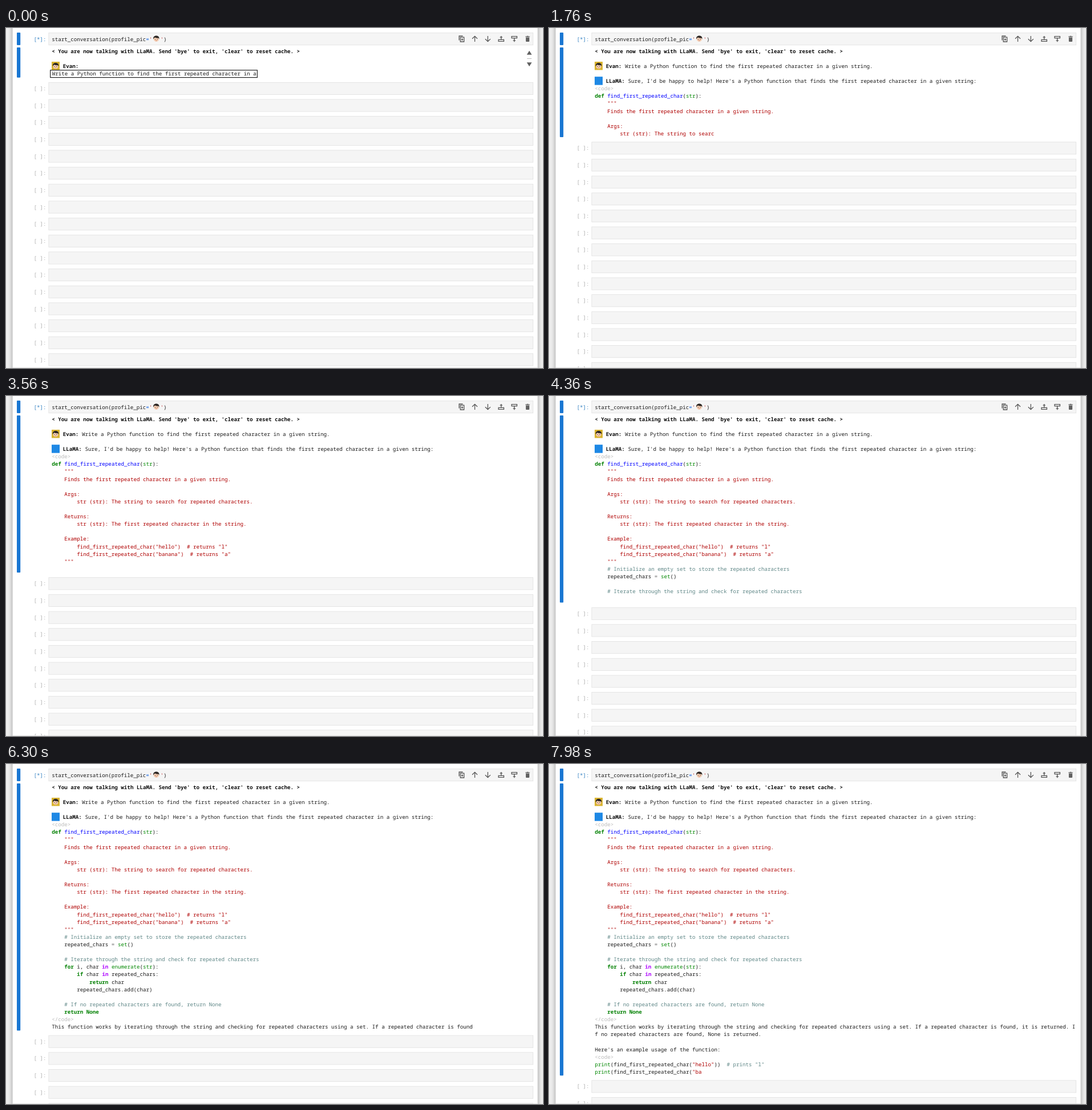
These frames come from a looping animation (941 px wide and 595 px high, 8000 ms). An HTML page:

```html
<!DOCTYPE html>
<html lang="en">
<head>
<meta charset="utf-8">
<title>Notebook chat</title>
<style>
  html, body { margin: 0; width: 100%; height: 100%; overflow: hidden; background: #eee; }
  svg { display: block; width: 941px; height: 595px; }
  text {
    font: 9.19px "Noto Sans Mono", "DejaVu Sans Mono", monospace;
    fill: #1c1c1c; white-space: pre; text-rendering: geometricPrecision;
  }
  .paper { fill: #fff; filter: drop-shadow(0 1px 4px rgba(0, 0, 0, .38)); }
  .box { fill: #f5f5f5; stroke: #e0e0e0; stroke-width: .8; }
  .bar { fill: #1976d2; }
  .icon { fill: none; stroke: #555; stroke-width: 1.3; }
  .solid { fill: #616161; }
  .bold { font-weight: 700; fill: #111; }
  .idle { fill: #adadad; }
  .busy { fill: #307fc1; }
  .tag { fill: #bcbcbc; }
  .str { fill: #af0000; }
  .com { fill: #5f8787; }
  .key { fill: #008000; font-weight: 700; }
  .word { fill: #af00ff; font-weight: 700; }
  .fn { fill: #0000ff; }
  .type { fill: #008700; }
  .op { fill: #666; }
  .assign { fill: #055be0; }
  .quote { fill: #ba2121; }
</style>
</head>
<body>
<svg viewBox="0 0 941 595">
  <defs>
    <g id="boy">
      <ellipse cx="0" cy=".6" rx="4.6" ry="4.4" fill="#f6cfb4"/>
      <path d="M-4.9 1C-6-3-3.6-5.4 0-5.4S6-3 4.9 1L4-1.2Q0-.6-2.4-2.2L-4-1Z" fill="#2b2522"/>
      <circle cx="-1.8" cy="1" r=".65" fill="#2b2522"/>
      <circle cx="1.8" cy="1" r=".65" fill="#2b2522"/>
      <path d="M-1.2 3.1Q0 3.9 1.2 3.1" fill="none" stroke="#b4604c" stroke-width=".7"/>
    </g>
  </defs>
  <rect class="paper" x="11.6" y="-30" width="920" height="660"/>

  <rect class="box" x="74.9" y="8.4" width="848.7" height="21.4"/>
  <rect class="bar" x="19" y="8" width="6.2" height="22" rx="1"/>
  <text class="busy" x="48.5" y="22.5">[*]:</text>
  <text x="80.2" y="22.5">start_conversation(profile_pic<tspan class="assign">=</tspan><tspan class="quote">'</tspan></text>
  <use href="#boy" x="263.3" y="18.8"/>
  <text x="270.6" y="22.5"><tspan class="quote">'</tspan>)</text>

  <g class="icon">
    <path d="M794 21.5V14H800.5M796.2 16.2H802.6V24H796.2ZM797.6 20.1H801.2M799.4 18.3V21.9"/>
    <path d="M821.5 24V14.4M817 18.8L821.5 14.3L826 18.8"/>
    <path d="M844.3 14V23.6M839.8 19.2L844.3 23.7L848.8 19.2"/>
    <path d="M863 20.4H872.4V23.4H863ZM867.7 20V14M865.5 16.2H869.9"/>
    <path d="M886 14.6H895.4V17.6H886ZM890.7 18V24.2M888.5 21.8H892.9"/>
  </g>
  <path class="solid" d="M910.3 14.6H912.4L913 13.8H915L915.6 14.6H917.7V15.8H910.3ZM910.9 16.5H917.1V23Q917.1 24 916.1 24H911.9Q910.9 24 910.9 23Z"/>
  <g id="out"></g>
  <rect y="594" x="12" width="919" height="1" fill="#e4e4e4"/>
</svg>

<script>
const LOOP = 8000, STEP = 20;
const X = 80.3, NAME_X = 99.8, CHAR = 5.514, TOP = 33.7, ROW = 13.115, COLS = 153;
const USER = "Evan:", BOT = "LLaMA: ";
const question = "Write a Python function to find the first repeated character in a given string.";
const answer = `Sure, I'd be happy to help! Here's a Python function that finds the first repeated character in a given string:
<code>
def find_first_repeated_char(str):
    """
    Finds the first repeated character in a given string.

    Args:
        str (str): The string to search for repeated characters.

    Returns:
        str (str): The first repeated character in the string.

    Example:
        find_first_repeated_char("hello")  # returns "l"
        find_first_repeated_char("banana")  # returns "a"
    """
    # Initialize an empty set to store the repeated characters
    repeated_chars = set()

    # Iterate through the string and check for repeated characters
    for i, char in enumerate(str):
        if char in repeated_chars:
            return char
        repeated_chars.add(char)

    # If no repeated characters are found, return None
    return None
</code>
This function works by iterating through the string and checking for repeated characters using a set. If a repeated character is found, it is returned. If no repeated characters are found, None is returned.

Here's an example usage of the function:
<code>
print(find_first_repeated_char("hello"))  # prints "l"
print(find_first_repeated_char("banana"))`;

// The stream arrives in word pieces; the newest letter is held back until the next piece.
const pieces = answer.match(/ {2,}(?= )|\n| ?(?:re(?=peated_)|pe(?=ated_)|ban(?=ana)|[A-Za-z]+|[^A-Za-z\n ]+)| /g);
const shown = [0];
let end = 0;
for (const p of pieces) {
  end += p.length;
  shown.push(p === "\n" ? end : end - 1);
}

// Pace of the stream: when each passage has been reached.
let pos = 0;
const pace = [[220, 0]].concat([
  [980, "first_repeate"],
  [1760, "searc"],
  [1860, "h for repeated characters"],
  [2680, "Example:\n"],
  [3560, '"a"\n    """\n'],
  [4320, "check for repeated character"],
  [5120, "chars.ad"],
  [6300, "character is found"],
  [7660, 'prints "l"\n'],
  [7980, '("ba']
].map(([ms, mark]) => {
  pos = answer.indexOf(mark, pos) + mark.length;
  return [ms, shown.findIndex(n => n >= pos)];
}));

function streamed(t) {
  if (t <= pace[0][0]) return "";
  const i = pace.findIndex(p => p[0] >= t);
  if (i < 0) return answer.slice(0, shown[pace[pace.length - 1][1]]);
  const [t0, k0] = pace[i - 1], [t1, k1] = pace[i];
  const k = Math.floor(k0 + (k1 - k0) * (t - t0) / (t1 - t0) + 1e-6);
  return answer.slice(0, shown[Math.max(k, 1)]);
}

const esc = s => s.replace(/&/g, "&amp;").replace(/</g, "&lt;");
const span = (cls, s) => `<tspan class="${cls}">${esc(s)}</tspan>`;
const label = (x, y, body, cls = "") => `<text class="${cls}" x="${x}" y="${y}">${body}</text>`;
const baseline = row => TOP + row * ROW + 9.9;

const syntax = /(#.*)|("[^"]*"?)|\b(def|for|if|return|None)\b|\b(in)\b|((?<=def )\w+)|\b(str|set|enumerate|print)\b|(=)/g;
const kinds = ["com", "str", "key", "word", "fn", "type", "op"];

function highlight(line) {
  let html = "", at = 0;
  for (const m of line.matchAll(syntax)) {
    const kind = kinds[m.slice(1).findIndex(g => g !== undefined)];
    html += esc(line.slice(at, m.index)) + span(kind, m[0]);
    at = m.index + m[0].length;
  }
  return html + esc(line.slice(at));
}

function reply(text) {
  let row = 4, code = false, doc = false, html = "";
  for (const line of text.split("\n")) {
    if (line[0] === "<") {
      code = line === "<code>";
      html += label(X, baseline(row++), span("tag", line));
    } else if (code) {
      const fence = line.includes('"""');
      html += label(X, baseline(row++), doc || fence ? span("str", line) : highlight(line));
      if (fence) doc = !doc;
    } else {
      const x = row === 4 ? NAME_X + BOT.length * CHAR : X;
      for (let c = 0; c === 0 || c < line.length; c += COLS)
        html += label(x, baseline(row++), esc(line.slice(c, c + COLS)));
    }
  }
  return { html, rows: row };
}

function prompt() {
  return `<svg x="77" y="73" width="362" height="15">${label(3.7, 10.4, question)}</svg>
    <rect x="77.7" y="73.8" width="362.6" height="12.8" fill="none" stroke="#111" stroke-width="1.1"/>
    <path class="solid" d="M912.6 46.8L917 39.8L921.4 46.8ZM912.6 60.2H921.4L917 67.2Z"/>
    <path d="M913 53.5H921" stroke="#aaa" stroke-width=".8"/>`;
}

function cells(bottom) {
  let html = "";
  for (let y = bottom + 8.2; y < 595; y += 29.66)
    html += `<rect class="box" x="74.9" y="${y + .4}" width="848.7" height="21.2"/>`
      + label(48.5, y + 14.1, "[ ]:", "idle");
  return html;
}

function scene(t) {
  let rows = 4;
  let html = label(X, baseline(0), "&lt; You are now talking with LLaMA. Send 'bye' to exit, 'clear' to reset cache. >", "bold")
    + '<rect x="80" y="59" width="14" height="14.5" fill="#d9b430"/><use href="#boy" x="87" y="66.4"/>'
    + label(NAME_X, baseline(2), USER, "bold");
  if (t < 20) html += prompt();
  if (t >= 40) html += label(NAME_X + (USER.length + 1) * CHAR, baseline(2), question);
  if (t >= 60) {
    const out = reply(streamed(t));
    rows = out.rows;
    html += '<rect x="80" y="85.2" width="14" height="14.5" fill="#1e88e5"/>'
      + label(NAME_X, baseline(4), BOT, "bold") + out.html;
  }
  const bottom = TOP + rows * ROW + (t < 20 ? .5 : 0);
  return html + `<rect class="bar" x="19" y="34" width="6.2" height="${bottom - 34}" rx="1"/>` + cells(bottom);
}

const out = document.getElementById("out");
const start = performance.now();
let last = -1;

function draw(now) {
  const t = Math.floor(Math.max(0, now - start) % LOOP / STEP) * STEP;
  if (t !== last) out.innerHTML = scene(last = t);
  requestAnimationFrame(draw);
}
draw(start);
</script>
</body>
</html>
```
